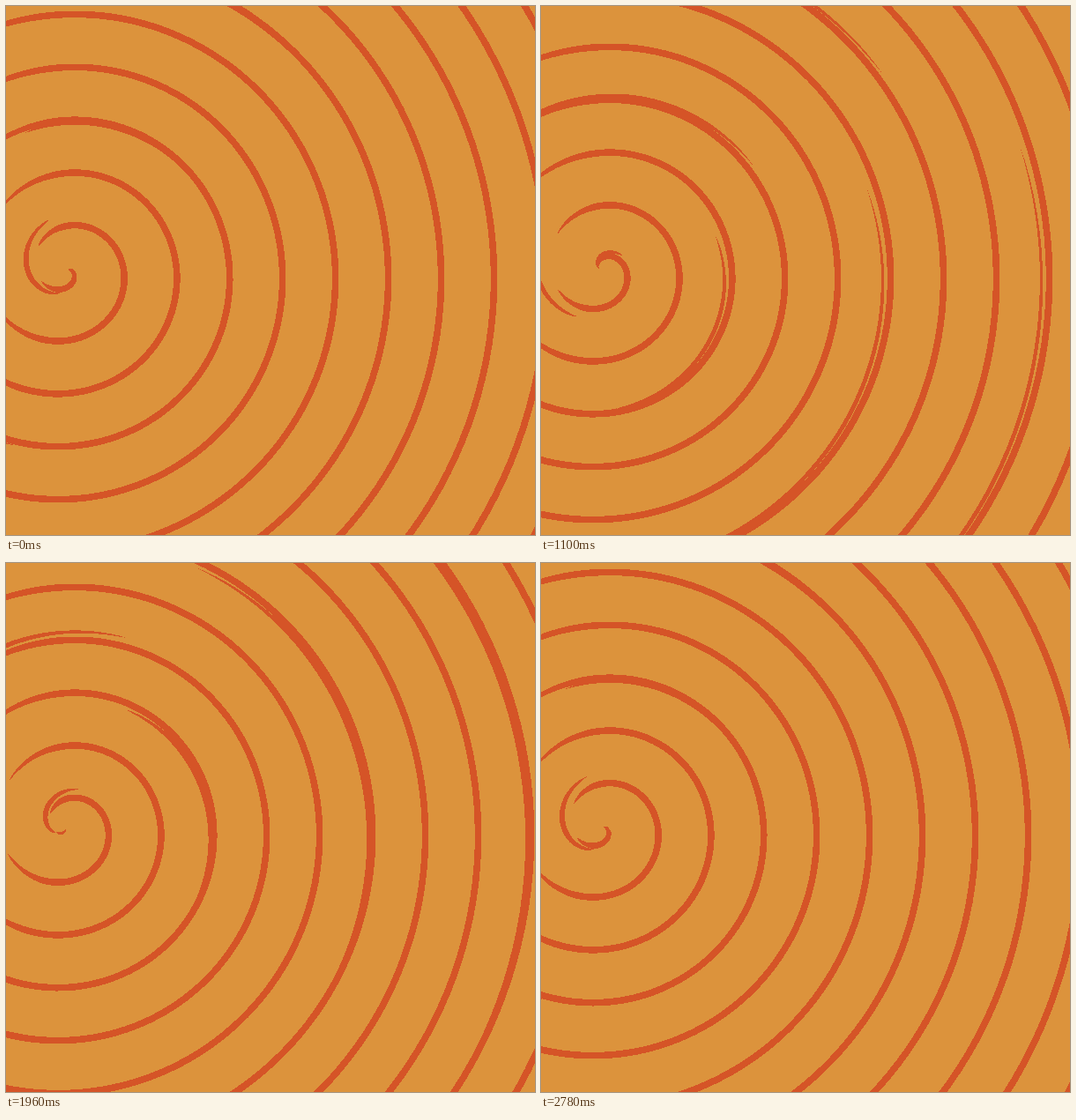
Write an HTML page that moves like this. It is 600 px wide and 600 px high and loops after 2800 ms.

```html
<!DOCTYPE html>
<html lang="en">
<head>
<meta charset="utf-8">
<title>Spiral</title>
<style>
  html, body { margin: 0; width: 100%; height: 100%; overflow: hidden; background: #dc933c; }
  svg { display: block; width: 100vw; height: 100vh; }
  path { fill: #d55427; shape-rendering: crispEdges; }
</style>
</head>
<body>
<svg viewBox="0 0 600 600"><path id="ink"/></svg>
<script>
const CX = 68.5, CY = 299.5, PITCH = 60, LOOP = 2800, STEPS = 60;
const ink = document.getElementById('ink');
const clamp = (v, lo = 0, hi = 1) => Math.min(hi, Math.max(lo, v));

// Turns run clockwise from the top.
function point(turn, r) {
  const a = turn * 2 * Math.PI;
  return (CX + r * Math.sin(a)).toFixed(2) + ' ' + (CY - r * Math.cos(a)).toFixed(2);
}

// Closed ribbon along a spiral, with radius and width given per turn.
function ribbon(from, to, radius, width) {
  const n = Math.max(12, Math.ceil((to - from) * 160));
  const outer = [], inner = [];
  for (let k = 0; k <= n; k++) {
    const turn = from + (to - from) * k / n;
    const r = radius(turn);
    if (r < 2) continue;
    const half = Math.min(width(turn, k / n), r) / 2;
    outer.push(point(turn, r + half));
    inner.push(point(turn, r - half));
  }
  return outer.length > 1 ? 'M' + outer.concat(inner.reverse()).join('L') + 'Z' : '';
}

// The main line thins out to nothing on the left side.
function mainWidth(turn) {
  const deg = (turn - Math.floor(turn)) * 360;
  const gap = Math.abs((deg - 278 + 540) % 360 - 180);
  return 7.6 * Math.pow(clamp((gap - 32) / 45), 0.6);
}

function mainLine(step) {
  const base = 50 + step;
  return ribbon((3 - base) / PITCH, (640 - base) / PITCH, t => base + PITCH * t, mainWidth);
}

// A steeper strand that slides across the main line, repeated every three rings.
function strand(age) {
  const from = Math.max(1.36 - 0.0068 * age, 0.47 + 0.015 * (age - 136));
  const to = 1.61 - 0.0055 * age;
  const size = 6.4 * clamp((age - 13) / 13) * clamp((154 - age) / 14);
  if (size <= 0 || to <= from) return '';
  const width = (t, p) => size * Math.pow(Math.max(0, Math.sin(Math.PI * p)), 0.6);
  let d = '';
  for (let shift = -180; shift <= 540; shift += 180) {
    d += ribbon(from, to, t => 6.5 + 1.3 * age + 82 * t + shift, width);
  }
  return d;
}

function draw(step) {
  ink.setAttribute('d', mainLine(step) + strand(step) + strand(step + STEPS) + strand(step + 2 * STEPS));
}

// Three uneven steps in every 140 ms.
function stepAt(ms) {
  const t = ms % LOOP, part = t % 140;
  return Math.floor(t / 140) * 3 + (part < 20 ? 0 : part < 120 ? 1 : 2);
}

const start = performance.now();
let shown = -1;
function tick(now) {
  const step = stepAt(Math.max(0, now - start));
  if (step !== shown) draw(shown = step);
  requestAnimationFrame(tick);
}
draw(0);
requestAnimationFrame(tick);
</script>
</body>
</html>
```
